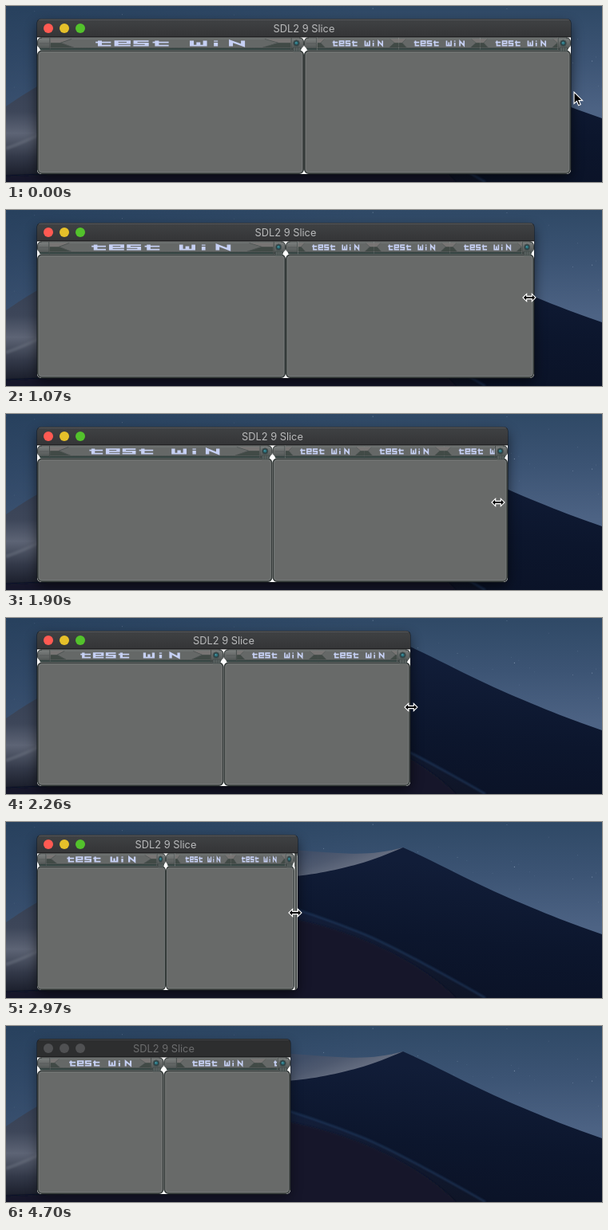
An HTML page for the animation above (4800 ms loop, 746 px wide and 221 px high).

```html
<!DOCTYPE html>
<html lang="en">
<head>
<meta charset="utf-8">
<title>SDL2 9 Slice</title>
<style>
html, body { margin: 0; width: 100%; height: 100%; overflow: hidden; background: #0c1428; }
svg { display: block; width: 100vw; height: 100vh; }
text { font: 12.8px Inter, "Liberation Sans", sans-serif; text-anchor: middle; }
</style>
</head>
<body>
<svg viewBox="0 0 746 221" preserveAspectRatio="none">
  <defs>
    <linearGradient id="sky" x2="0" y2="1">
      <stop offset="0" stop-color="#2f4966"/><stop offset=".3" stop-color="#3c5474"/><stop offset=".6" stop-color="#4d6384"/>
    </linearGradient>
    <linearGradient id="dusk"><stop offset="0" stop-color="#1c3450" stop-opacity=".4"/><stop offset=".6" stop-color="#1c3450" stop-opacity="0"/></linearGradient>
    <linearGradient id="face" x1=".3" x2="0" y2="1">
      <stop offset="0" stop-color="#111d38"/><stop offset=".45" stop-color="#0c162d"/><stop offset="1" stop-color="#0a1124"/>
    </linearGradient>
    <linearGradient id="lit" gradientUnits="userSpaceOnUse" x1="390" y1="34" x2="402" y2="66">
      <stop offset="0" stop-color="#414f68"/><stop offset=".5" stop-color="#4e596f"/><stop offset="1" stop-color="#626b7e"/>
    </linearGradient>
    <linearGradient id="near" x2="0" y2="1"><stop offset="0" stop-color="#14203c"/><stop offset=".5" stop-color="#111a31"/><stop offset="1" stop-color="#0f1527"/></linearGradient>
    <linearGradient id="west" x2="0" y2="1">
      <stop offset="0" stop-color="#313c50"/><stop offset=".45" stop-color="#3d4659"/><stop offset=".62" stop-color="#5d6475"/><stop offset=".8" stop-color="#333949"/><stop offset="1" stop-color="#131622"/>
    </linearGradient>
    <linearGradient id="bar" x2="0" y2="1"><stop offset="0" stop-color="#404244"/><stop offset="1" stop-color="#343537"/></linearGradient>
    <linearGradient id="metal" gradientUnits="userSpaceOnUse" x1="0" x2="0" y1="39" y2="55">
      <stop offset="0" stop-color="#3c4140"/><stop offset=".12" stop-color="#797d7c"/><stop offset=".5" stop-color="#676a69"/><stop offset=".82" stop-color="#555a59"/><stop offset="1" stop-color="#2c3534"/>
    </linearGradient>
    <filter id="blur" x="-30%" y="-30%" width="160%" height="160%"><feGaussianBlur stdDeviation="8"/></filter>
    <filter id="soft" x="-10%" y="-30%" width="120%" height="160%"><feGaussianBlur stdDeviation="1.2"/></filter>
    <clipPath id="frame"><rect id="frameBox" x="39" y="16.5" height="194.5" rx="5"/></clipPath>
    <clipPath id="run"><rect id="runBox" x="16.5" y="39" height="17"/></clipPath>

    <g id="capL">
      <path d="M0 46Q0 39.3 6 39.3H16.6V55.6H4Q3 52.5 0 50Z" fill="url(#metal)"/>
      <path d="M.6 49V46Q.6 40 6 40" fill="none" stroke="#3a403f"/>
      <path d="M4 54H16.6" stroke="#2c4541"/>
      <path d="M3 47H15" stroke="#565b5a"/>
      <path d="M15.9 40V54" stroke="#474d4c"/>
    </g>
    <g id="capR">
      <path d="M16.5 46Q16.5 39.3 10.5 39.3H-.1V55.6H12.5Q13.5 52.5 16.5 50Z" fill="url(#metal)"/>
      <path d="M15.9 49V46Q15.9 40 10.5 40" fill="none" stroke="#3a403f"/>
      <path d="M.6 40V54" stroke="#474d4c"/>
      <path d="M3 52H12V57H3ZM6 52V57M9 52V57" fill="#596160" stroke="#414a48" stroke-width=".7"/>
      <circle cx="7" cy="46.7" r="3.9" fill="#2e4144" stroke="#4d5756" stroke-width=".8"/>
      <circle cx="7" cy="46.5" r="2.1" fill="#2a7480"/>
      <circle cx="6.5" cy="46" r=".7" fill="#63a6ae"/>
    </g>
    <g id="mid">
      <path d="M-.1 39.3H102.1V55.6H-.1Z" fill="url(#metal)"/>
      <path d="M0 54H102" stroke="#2c4541"/>
      <path d="M9 41.5H91L96 46.5L90 52H10L4 46.5Z" fill="#656867"/>
      <path d="M0 41.5H9L4.5 46H0ZM102 41.5H91L96.5 46H102Z" fill="#777473"/>
      <path d="M0 46.2H4.5L9.5 52H0ZM102 46.2H96.5L90.5 52H102Z" fill="#414a46"/>
      <path d="M9 41.5L4.3 46.3L9.8 52M91 41.5L96.7 46.3L90.2 52" fill="none" stroke="#4b5150" stroke-width=".6"/>
      <path transform="translate(19.2 43.4)" fill="none" stroke="#c6d0f4" stroke-width="1.7"
        d="M1.8 0V6.2H6.5M0 2.2H6.5M14.8 6.2H8.8V.8H14V3.5H8.8M22.5 .8H16.9V3.5H21.7V6.2H16M26 0V6.2H31M24.2 2.2H31M40.8 0V6.2H46.4V0M43.6 2V6.2M51 0V1.4M51 2.6V7M57.4 7V.8L62.5 6.2V0"/>
    </g>
  </defs>

  <path d="M0 0H746V221H0Z" fill="url(#sky)"/>
  <path d="M0 0H746V221H0Z" fill="url(#dusk)"/>
  <g id="stars" fill="#b4c6de"></g>
  <path d="M0 126Q20 112 39 101L180 60V221H0Z" fill="url(#west)"/>
  <path d="M0 179Q20 172 45 160" fill="none" stroke="#757b89" stroke-width="4" opacity=".4" filter="url(#soft)"/>
  <path d="M100 221V160L300 70L360 68L497 32C535 49 560 63 596 80S690 122 746 141V221Z" fill="url(#face)"/>
  <path d="M280 33C350 33 380 37 415 39S470 39 497 32C478 40 462 47 440 53S385 67 350 69L280 74Z" fill="url(#lit)"/>
  <path d="M0 221V212L200 205L320 96C360 108 402 122 444 139S560 198 600 221Z" fill="url(#near)"/>
  <path d="M320 96C360 108 402 122 444 139S560 198 600 221" fill="none" stroke="#28466f" stroke-width="2.2" opacity=".6" filter="url(#soft)"/>
  <path d="M0 221V214L200 205L340 118C430 132 520 175 563 221Z" fill="#15192b" filter="url(#soft)"/>

  <rect id="shadow" x="39" y="23" height="193" rx="6" filter="url(#blur)"/>
  <rect id="rim" x="38.5" y="16" height="195.5" rx="5.5" fill="#15181d"/>
  <g clip-path="url(#frame)">
    <path d="M39 39H746V211H39Z" fill="#fff"/>
    <g id="view">
      <g id="left"></g>
      <g id="right"></g>
    </g>
    <g id="stale">
      <path d="M0 39H5V211H0Z" fill="#686a69"/>
      <path d="M.5 56V211M3.5 42V211" stroke="#a3a6a5"/>
      <path d="M2 39V211" stroke="#3d4342" stroke-width="1.6"/>
    </g>
    <rect id="title" x="39" y="16" height="23"/>
    <rect id="shine" x="39" y="16.5" height="1" fill="#65676a"/>
    <rect id="seam" x="39" y="38.4" height="1" fill="#141516"/>
  </g>
  <g id="lights"><circle cx="53" cy="28" r="6"/><circle cx="73" cy="28" r="6"/><circle cx="93" cy="28" r="6"/></g>
  <text id="name" y="33">SDL2 9 Slice</text>
  <path id="arrow" d="M0 0V14.6L3.4 11.5L5.6 16.8L8.2 15.7L6 10.6H10.6Z" fill="#000" stroke="#fff" stroke-width="1.1"/>
  <path id="sizer" d="M-8 0L-3.3-4.6V-1.6H3.3V-4.6L8 0L3.3 4.6V1.6H-3.3V4.6Z" fill="#000" stroke="#fff" stroke-width="1.1"/>
</svg>
<script>
const $ = id => document.getElementById(id);
const set = (el, attrs) => { for (const k in attrs) el.setAttribute(k, attrs[k]); };
const add = (parent, tag, attrs = {}) => {
  const el = document.createElementNS('http://www.w3.org/2000/svg', tag);
  set(el, attrs);
  return parent.appendChild(el);
};

const LOOP = 4800, X = 39, CAP = 16.5, TILE = 102;

// time, window edge, pointer kind, pointer x, pointer y, width of the stale strip
const poses = [
  [0, 707, 'arrow', 711, 108],
  [120, 707, 'arrow', 709, 107],
  [240, 707, 'sizer', 708, 110],
  [830, 694, 'sizer', 684, 109],
  [950, 678, 'sizer', 668, 109],
  [1070, 661, 'sizer', 655, 110],
  [1190, 649, 'sizer', 648, 110],
  [1310, 644, 'sizer', 645, 110],
  [1900, 628, 'sizer', 616, 111],
  [2020, 585, 'sizer', 570, 111],
  [2140, 532, 'sizer', 520, 112],
  [2260, 506, 'sizer', 507, 112],
  [2730, 488, 'sizer', 478, 113],
  [2850, 425, 'sizer', 408, 113],
  [2970, 365, 'sizer', 362, 114, 4],
  [3090, 357, 'sizer', 358, 114],
  [3210, 356, 'sizer', 357, 114],
  [4050, 356, 'arrow', 511, 163],
  [4170, 356, 'none', 0, 0]
];
// the panels are laid out again only when a drag ends
const layouts = [[0, 707], [1310, 644], [2260, 506], [3210, 356]];
const latest = (list, t) => list.filter(row => row[0] <= t).pop();

let seed = 11;
const rnd = () => (seed = seed * 16807 % 2147483647) / 2147483647;
for (let i = 0; i < 60; i++)
  add($('stars'), 'circle', { cx: rnd() * 746, cy: rnd() * 130, r: .3 + rnd() * .3, opacity: .15 + rnd() * .4 });

function makePanel(root, tiled) {
  const body = add(root, 'rect', { x: .8, y: 56.3, height: 153.9, rx: 5, fill: '#686a69', stroke: '#343a39', 'stroke-width': 1.6 });
  const inner = add(root, 'rect', { x: 2.4, y: 57.9, height: 150.7, rx: 3.5, fill: 'none', stroke: '#747877', 'stroke-width': .9 });
  const run = add(root, 'g', tiled ? { 'clip-path': 'url(#run)' } : {});
  const tiles = [];
  for (let i = 0; i < (tiled ? 4 : 1); i++) tiles.push(add(run, 'use', { href: '#mid' }));
  add(root, 'use', { href: '#capL' });
  const cap = add(root, 'use', { href: '#capR' });
  return (x, w) => {
    const span = w - 2 * CAP;
    set(root, { transform: `translate(${x} 0)` });
    set(body, { width: w - 1.6 });
    set(inner, { width: w - 4.8 });
    set(cap, { x: w - CAP });
    tiles.forEach((tile, i) => set(tile, {
      transform: `translate(${CAP + i * TILE} 0) scale(${tiled ? 1 : span / TILE} 1)`
    }));
    if (tiled) set($('runBox'), { width: span });
  };
}
const layLeft = makePanel($('left'), false);
const layRight = makePanel($('right'), true);

function draw(t) {
  const [, edge, kind, px, py, strip = 0] = latest(poses, t);
  const full = latest(layouts, t)[1] - X;
  const width = edge - X;
  const shown = width - strip;
  const active = t < 4700;

  layLeft(0, full / 2);
  layRight(full / 2, full / 2);
  set($('view'), { transform: `translate(${X} 0) scale(${shown / full} 1)` });
  set($('stale'), { transform: `translate(${X + shown} 0)` });

  for (const id of ['frameBox', 'shadow', 'title', 'shine', 'seam']) set($(id), { width });
  set($('rim'), { width: width + 1 });
  set($('shadow'), { opacity: active ? .6 : .4 });
  set($('title'), { fill: active ? 'url(#bar)' : '#2d2e2f' });
  set($('shine'), { opacity: active ? 1 : .6 });
  set($('name'), { x: X + shown / 2, fill: active ? '#b9babb' : '#6c6d6e' });
  const hues = active ? ['#ff5a52', '#e6c02a', '#53c22c'] : Array(3).fill('#505153');
  [...$('lights').children].forEach((dot, i) => set(dot, { fill: hues[i] }));

  for (const id of ['arrow', 'sizer'])
    set($(id), { transform: `translate(${px} ${py})`, visibility: id === kind ? 'visible' : 'hidden' });
}

const start = performance.now();
function tick() {
  draw((performance.now() - start) % LOOP);
  requestAnimationFrame(tick);
}
draw(0);
requestAnimationFrame(tick);
</script>
</body>
</html>
```
